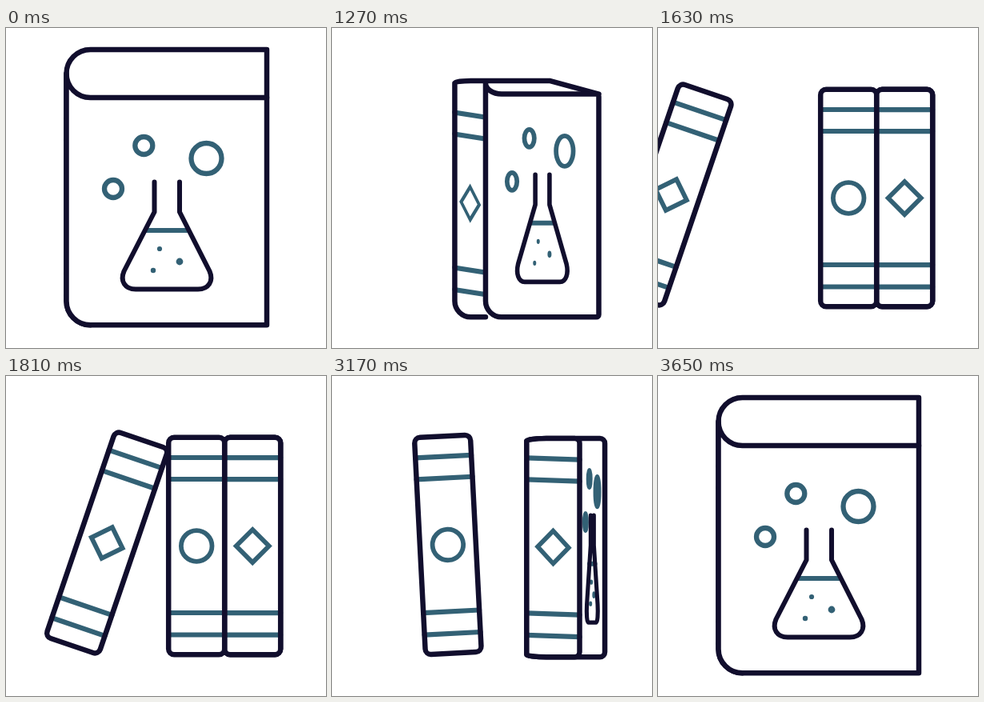
An HTML page with a canvas that plays this animation: 400x400 px, repeating every 3680 ms.

```html
<!DOCTYPE html>
<html lang="en">
<head>
<meta charset="utf-8">
<title>Books</title>
<style>
  html, body { margin: 0; height: 100%; overflow: hidden; background: #fff; }
  canvas { display: block; width: 100vw; height: 100vh; object-fit: contain; }
</style>
</head>
<body>
<canvas id="stage" width="400" height="400"></canvas>
<script>
const ctx = document.getElementById('stage').getContext('2d');
const NAVY = '#110e2d', TEAL = '#336175', LINE = 6.5;
const LOOP = 3680, STEP = 30, STEPS = 27, OPEN = 1030, CLOSE = 2870, MIRROR = 4640;
const BOOK_W = 70, BOOK_H = 271.5, MID_Y = 212.5;

const lerp = (a, b, p) => a + (b - a) * p;
const ease = (t, start, duration) => {
  const s = Math.min(1, Math.max(0, (t - start) / duration));
  return s * s * (3 - 2 * s);
};

function stroke(color, width) {
  ctx.strokeStyle = color;
  ctx.lineWidth = width;
  ctx.stroke();
}

function fillWhite() {
  ctx.fillStyle = '#fff';
  ctx.fill();
}

// Quarter ellipse from (x0,y0) to (x1,y1) around the corner (cx,cy)
function bend(x0, y0, cx, cy, x1, y1) {
  const k = 0.5523;
  ctx.bezierCurveTo(lerp(x0, cx, k), lerp(y0, cy, k), lerp(x1, cx, k), lerp(y1, cy, k), x1, y1);
}

// Upright panel: wide left corners from y0 and y1, right corners of radius q
function panel(left, right, top, bottom, rx, y0, y1, q) {
  ctx.beginPath();
  ctx.moveTo(left, y0);
  bend(left, y0, left, top, left + rx, top);
  ctx.lineTo(right - q, top);
  bend(right - q, top, right, top, right, top + q);
  ctx.lineTo(right, bottom - q);
  bend(right, bottom - q, right, bottom, right - q, bottom);
  ctx.lineTo(left + rx, bottom);
  bend(left + rx, bottom, left, bottom, left, y1);
  ctx.closePath();
}

function markings(w, emblem) {
  ctx.beginPath();
  for (const y of [-110.5, -83.5, 83.5, 111]) {
    ctx.moveTo(-w / 2, y);
    ctx.lineTo(w / 2, y);
  }
  stroke(TEAL, 6.2);
  ctx.save();
  ctx.scale(w / BOOK_W, 1);
  ctx.lineJoin = 'miter';
  ctx.beginPath();
  if (emblem === 'circle') {
    ctx.arc(0, 0, 19.3, 0, 2 * Math.PI);
  } else {
    ctx.moveTo(0, -20.5);
    ctx.lineTo(20.5, 0);
    ctx.lineTo(0, 20.5);
    ctx.lineTo(-20.5, 0);
    ctx.closePath();
  }
  stroke(TEAL, 5.8);
  ctx.restore();
}

function spine(cx, cy, degrees, emblem) {
  const outline = () => {
    ctx.beginPath();
    ctx.roundRect(-BOOK_W / 2, -BOOK_H / 2, BOOK_W, BOOK_H, 7);
  };
  ctx.save();
  ctx.translate(cx, cy);
  ctx.rotate(degrees * Math.PI / 180);
  outline();
  fillWhite();
  markings(BOOK_W, emblem);
  outline();
  stroke(NAVY, LINE);
  ctx.restore();
}

// The flask picture, squeezed horizontally towards the cover's right edge
function flask(right, k, dy, p) {
  const X = x => right - (326 - x) * k;
  ctx.save();
  ctx.translate(0, dy);
  for (const [x, y, r] of [[172.3, 147, 11], [250.5, 163, 19], [134, 201, 11]]) {
    ctx.beginPath();
    ctx.ellipse(X(x), y, r * k, r, 0, 0, 2 * Math.PI);
    stroke(TEAL, lerp(6.3, 5, p));
  }
  ctx.fillStyle = TEAL;
  for (const [x, y, r] of [[192, 276, 3.1], [217, 292, 4.4], [184, 303, 3.2]]) {
    ctx.beginPath();
    ctx.ellipse(X(x), y, Math.max(2, r * k), r, 0, 0, 2 * Math.PI);
    ctx.fill();
  }
  ctx.beginPath();
  ctx.moveTo(X(175), 253);
  ctx.lineTo(X(227), 253);
  stroke(TEAL, 6);
  ctx.beginPath();
  ctx.moveTo(X(185.5), 192.5);
  ctx.lineTo(X(185.5), 230);
  ctx.lineTo(X(147.5), 304);
  bend(X(147.5), 304, X(138), 326.5, X(162), 326.5);
  ctx.lineTo(X(240), 326.5);
  bend(X(240), 326.5, X(264), 326.5, X(254.5), 304);
  ctx.lineTo(X(217), 230);
  ctx.lineTo(X(217), 192.5);
  stroke(NAVY, lerp(6, 5, p));
  ctx.restore();
}

// The large book turning from its cover to its spine
function turningBook(p) {
  const left = lerp(75.5, 343.2, p), right = lerp(326, 343.2, p);
  const spineWidth = BOOK_W * (1 - (1 - p) ** 1.4), back = left - spineWidth;
  const top = lerp(87, 76.8, p), bottom = lerp(371.3, 348.3, p);
  const shoulder = lerp(57, 84, p);
  const width = right - left, r = lerp(30, 7, p), q = 7 * p;

  const spineMarkings = () => {
    ctx.save();
    ctx.transform(1, 0.28 * (1 - p), 0, 1, (back + left) / 2, (top + bottom) / 2 - 5 * (1 - p));
    markings(spineWidth, 'diamond');
    ctx.restore();
  };
  const coverFlask = () => flask(right, width / 250.5, -21 * p, p);

  if (p < 0.75) {
    const flapTop = top - 60 * (1 - p) ** 2.25;
    const outline = () => {
      ctx.beginPath();
      ctx.moveTo(right, top);
      ctx.lineTo(right - width * p, flapTop);
      ctx.lineTo(back + r, flapTop);
      bend(back + r, flapTop, back, flapTop, back, shoulder);
      ctx.lineTo(back, bottom - r);
      bend(back, bottom - r, back, bottom, back + r, bottom);
      ctx.lineTo(Math.max(left, back + r), bottom);
    };
    outline();
    fillWhite();
    spineMarkings();
    outline();
    stroke(NAVY, LINE);
    panel(left, right, top, bottom, r, shoulder, bottom - r, q);
    fillWhite();
    stroke(NAVY, LINE);
    coverFlask();
  } else {
    const rx = 7 + 140 * (1 - p), drop = Math.max(3, shoulder - top);
    const face = edge => panel(back, edge, top, bottom, rx, top + drop, bottom - drop, q);
    face(right);
    fillWhite();
    stroke(NAVY, LINE);
    if (p < 1) coverFlask();
    face(left);
    fillWhite();
    spineMarkings();
    face(left);
    stroke(NAVY, LINE);
  }
}

function draw(t) {
  ctx.clearRect(0, 0, 400, 400);
  ctx.lineCap = ctx.lineJoin = 'round';
  turningBook(ease(t, 986, 622));
  const away = 1 - ease(t, 1262.5, 330);
  if (away < 1) spine(238.2 - 300 * away, MID_Y - 5 * away, -9.5 * away, 'circle');
  const gone = 1 - ease(t, 1460, 330);
  if (gone < 1) spine(126.2 - 230 * gone, 208.5, 18.8, 'diamond');
}

// Steps run forwards, rest, then run back along the same path
function pose(t) {
  const held = start => start + STEP * Math.min(STEPS - 1, Math.floor((t - start) / STEP));
  if (t < OPEN) return 0;
  return t < CLOSE ? held(OPEN) : MIRROR - held(CLOSE);
}

const began = performance.now();
function tick() {
  draw(pose((performance.now() - began) % LOOP));
  requestAnimationFrame(tick);
}
tick();
</script>
</body>
</html>
```
